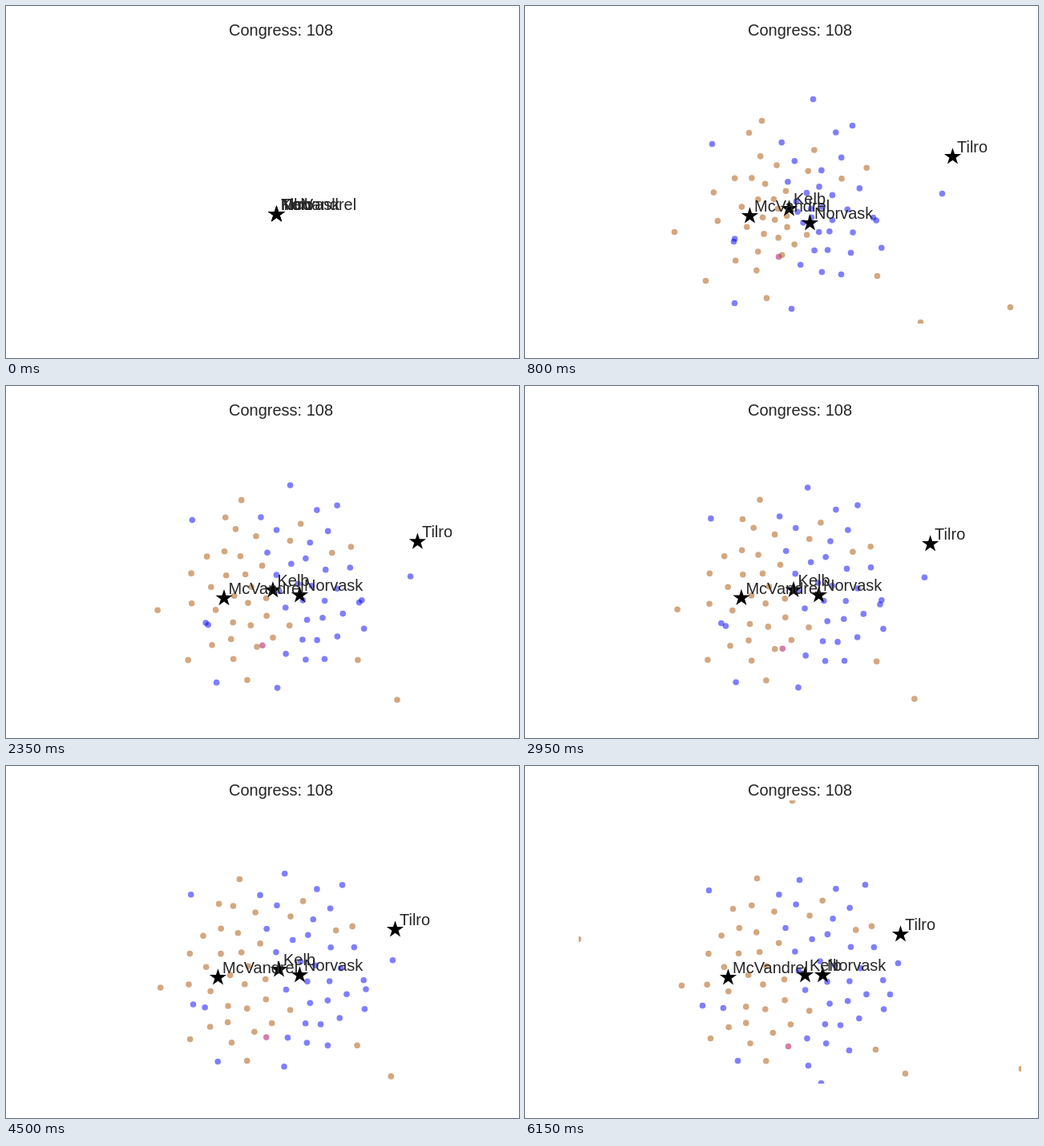
Write an HTML page with a canvas that moves like this. It is 640 by 440 pixels and loops after 6.2 s.

```html
<!DOCTYPE html>
<html lang="en">
<head>
<meta charset="utf-8">
<title>Congress: 108</title>
<style>
html, body { margin: 0; width: 100%; height: 100%; overflow: hidden; background: #fff; }
canvas { display: block; }
</style>
</head>
<body>
<canvas id="stage" width="640" height="440"></canvas>
<script>
const ctx = document.getElementById('stage').getContext('2d');
const LOOP = 6200, STEP = 50, BURST = 50, SETTLE = 800, END = 6150;
const ORIGIN = [337, 260];
const PLOT = { x: 67, y: 43, w: 552, h: 354 };
const BLUE = 'rgba(0,0,255,.5)', BROWN = 'rgba(170,80,0,.5)', PINK = 'rgba(168,0,82,.5)';

// The core of the cloud: a sunflower pattern that loosens with time.
const CORE = { center: [335, 258], radius: 120, count: 66, jitter: 9, relax: 1500 };

const dots = [], stars = [];
const mix = (a, b, k) => a.map((v, i) => v + (b[i] - v) * k);
const dist = (a, b) => Math.hypot(a[0] - b[0], a[1] - b[1]);
const linear = t => (t - SETTLE) / (END - SETTLE);
const relaxing = t => 1 - Math.exp((SETTLE - t) / CORE.relax);

function randomFrom(seed) {
  return () => (seed = (seed * 16807) % 2147483647) / 2147483647;
}

const rim = (color, x0, y0, x1, y1) =>
  dots.push({ color, from: [x0, y0], to: [x1, y1], pace: linear });

// Drifters cross the edge of the plot and take no part in the burst.
const drifter = (color, x0, y0, x1, y1) =>
  dots.push({ color, from: [x0, y0], to: [x1, y1], pace: linear, late: true });

rim(BLUE, 359, 116, 342, 142);
rim(BLUE, 408, 149, 424, 148);
rim(BLUE, 233, 172, 229, 155);
rim(BLUE, 520, 234, 465, 246);
rim(BLUE, 434, 264, 455, 285);
rim(BLUE, 394, 335, 404, 355);
rim(BLUE, 332, 378, 353, 374);
rim(BLUE, 261, 371, 265, 368);
rim(BLUE, 260, 294, 221, 299);
rim(BROWN, 295, 143, 289, 140);
rim(BROWN, 279, 158, 259, 178);
rim(BROWN, 186, 282, 195, 274);
rim(BROWN, 225, 343, 231, 340);
rim(BROWN, 439, 337, 437, 354);
rim(BROWN, 493, 395, 474, 384);
rim(PINK, 316, 313, 328, 350);

drifter(BROWN, 605, 376, 605, 640);
drifter(BROWN, 640, 392, 619, 378);
drifter(BROWN, 50, 220, 66, 216);
drifter(BROWN, 340, 18, 333, 43);
drifter(BLUE, 369, 440, 369, 396);

function addCore() {
  const rand = randomFrom(108);
  const nudge = p => p.map(v => v + (rand() - .5) * CORE.jitter);
  const goldenAngle = Math.PI * (3 - Math.sqrt(5));
  const taken = dots.map(d => d.to);

  for (let i = 0; i < CORE.count; i++) {
    const q = Math.sqrt((i + .5) / CORE.count), r = CORE.radius * q, a = i * goldenAngle;
    const dx = r * Math.cos(a), dy = r * Math.sin(a);
    const to = nudge([CORE.center[0] + dx, CORE.center[1] + dy]);
    const from = nudge(mix(CORE.center, to, .6 + .4 * q ** 3));
    const stray = rand() < .1;
    if (taken.some(p => dist(p, to) < 16)) continue;
    const right = dx > .35 * dy;
    dots.push({ color: right !== stray ? BLUE : BROWN, from, to, pace: relaxing });
  }
}
addCore();

const STAR_TIMES = [SETTLE, 1650, 4500, END];
const star = (name, ...points) => stars.push({ name, points });
star('Tilro', [533, 188], [522, 191], [485, 204], [468, 210]);
star('McVandrel', [280, 262], [274, 265], [264, 264], [253, 264]);
star('Kelb', [329, 253], [330, 255], [340, 254], [349, 261]);
star('Norvask', [355, 271], [366, 261], [366, 261], [371, 261]);

// Dots burst slightly past their places and settle; stars only slow down.
const overshoot = u => 1 + 2.2 * (u - 1) ** 3 + 1.2 * (u - 1) ** 2;
const slowDown = u => 1 - (1 - u) ** 1.35;

function burst(to, t, ease) {
  return t < 2 * BURST ? ORIGIN : mix(ORIGIN, to, ease((t - BURST) / (SETTLE - BURST)));
}

function dotAt({ from, to, pace }, t) {
  return t < SETTLE ? burst(from, t, overshoot) : mix(from, to, pace(t));
}

function starAt({ points }, t) {
  if (t < SETTLE) return burst(points[0], t, slowDown);
  const i = Math.max(1, STAR_TIMES.findIndex(s => t <= s)), t0 = STAR_TIMES[i - 1];
  return mix(points[i - 1], points[i], (t - t0) / (STAR_TIMES[i] - t0));
}

function drawDot(d, t) {
  if (d.late && t < SETTLE) return;
  const [x, y] = dotAt(d, t);
  ctx.fillStyle = d.color;
  ctx.beginPath();
  ctx.arc(x + .5, y + .5, 3.8, 0, Math.PI * 2);
  ctx.fill();
}

function drawStar([x, y]) {
  ctx.beginPath();
  for (let i = 0; i < 10; i++) {
    const r = i % 2 ? 4.3 : 11.2, a = i * Math.PI / 5;
    ctx.lineTo(x + .5 + r * Math.sin(a), y + .5 - r * Math.cos(a));
  }
  ctx.fill();
}

function draw(t) {
  ctx.fillStyle = '#fff';
  ctx.fillRect(0, 0, 640, 440);

  ctx.save();
  ctx.beginPath();
  ctx.rect(PLOT.x, PLOT.y, PLOT.w, PLOT.h);
  ctx.clip();
  dots.forEach(d => drawDot(d, t));
  ctx.restore();

  const spots = stars.map(s => starAt(s, t));
  ctx.fillStyle = '#000';
  spots.forEach(drawStar);

  ctx.fillStyle = '#262626';
  ctx.font = '20px "Liberation Sans", Arial, sans-serif';
  ctx.textAlign = 'left';
  stars.forEach((s, i) => ctx.fillText(s.name, spots[i][0] + 6, spots[i][1] - 5));
  ctx.textAlign = 'center';
  ctx.fillText('Congress: 108', 343, 37);
}

const start = performance.now();
function tick() {
  const t = (performance.now() - start) % LOOP;
  draw(Math.floor(t / STEP) * STEP);
  requestAnimationFrame(tick);
}
tick();
</script>
</body>
</html>
```
